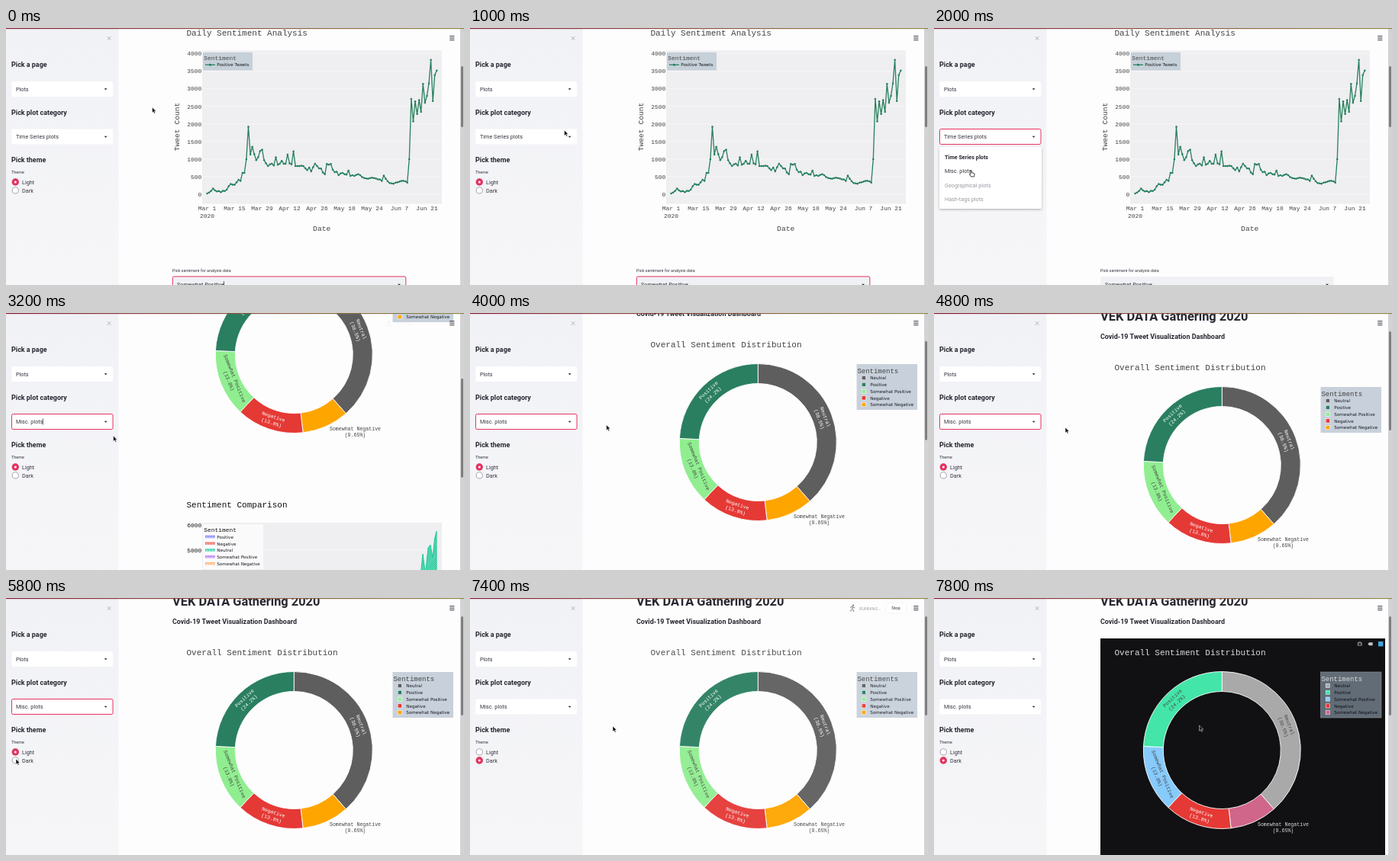
An HTML page that plays this animation: 600 px wide and 337 px high, repeating every 8 s.

```html
<!DOCTYPE html>
<html lang="en">
<head>
<meta charset="utf-8">
<title>Sentiment dashboard</title>
<style>
  html, body { margin: 0; width: 100%; height: 100%; overflow: hidden; background: #fefdfe; }
  svg { display: block; width: 100vw; height: 100vh; }
  text { font-family: Roboto, sans-serif; fill: #33343d; white-space: pre; }
  .b { font-weight: 700; fill: #262730; }
  .mono { font-family: "Liberation Mono", monospace; fill: #444; }
  .key { font-family: "DejaVu Sans", sans-serif; fill: #14181f; }
  .mid { text-anchor: middle; }
  .end { text-anchor: end; }
</style>
</head>
<body>
<svg id="stage" viewBox="0 0 600 337" preserveAspectRatio="none"></svg>
<script>
const LOOP = 8000, STEP = 200, RED = '#e8315f';

// ---------- drawing helpers ----------
const rect = (x, y, w, h, fill, more = '') =>
  `<rect x="${x}" y="${y}" width="${w}" height="${h}" fill="${fill}" ${more}/>`;
const text = (x, y, size, str, cls = '', more = '') =>
  `<text x="${x}" y="${y}" font-size="${size}" class="${cls}" ${more}>${str}</text>`;
const path = (d, more = '') => `<path d="${d}" ${more}/>`;
const dot = (x, y, r, more = '') => `<circle cx="${x}" cy="${y}" r="${r}" ${more}/>`;
const group = (id, body, more = '') => `<g id="${id}" ${more}>${body}</g>`;
const arrowDown = (x, y) => path(`M${x - 2} ${y - 0.9}h4l-2 2.1z`, 'fill="#262730"');
const caret = (id, x, y) => rect(x, y, 0.7, 8.4, '#262730', `id="${id}"`);

// ---------- sidebar ----------
const select = (y, label, id = '') =>
  rect(7.5, y, 132.5, 20, '#fff', `rx="1.8" ${id && `id="${id}Box"`}`) +
  text(13, y + 12.6, 7.25, label, '', id && `id="${id}Text"`) + arrowDown(130.6, y + 10.1);

const radio = (id, y, label) =>
  dot(12.3, y, 4.1, 'fill="#fff" stroke="#8f9098" stroke-width=".8"') +
  group(id, dot(12.3, y, 4.6, `fill="${RED}"`) + dot(12.3, y, 1.5, 'fill="#fff"')) +
  text(21, y + 2.7, 7.25, label);

const options = ['Time Series plots', 'Misc. plots', 'Geographical plots', 'Hash-tags plots'];
const menu = rect(7, 156, 134, 81, '#fff', 'rx="1.8" filter="url(#shadow)"') +
  options.map((o, i) => text(14, 171.8 + i * 18.4, 7.25, o, i ? '' : 'b',
    i > 1 ? 'style="fill:#9a9ba2"' : '')).join('');

const sidebar = rect(0, 0, 147.5, 337, 'url(#side)') +
  path('M132.8 11.2l4.6 4.6m0-4.6l-4.6 4.6', 'stroke="#a9abb3" stroke-width=".9"') +
  text(7, 51.3, 8.95, 'Pick a page', 'b') + select(70, 'Plots') +
  text(7, 113.8, 8.95, 'Pick plot category', 'b') + select(132.5, options[0], 'plot') +
  caret('plotCaret', 47.9, 138.3) +
  text(7, 176, 8.95, 'Pick theme', 'b') + text(7, 191, 5.5, 'Theme') +
  radio('light', 201.9, 'Light') + radio('dark', 212.9, 'Dark') + group('menu', menu);

// ---------- time series page ----------
// Daily counts in tens, starting on 1 March.
const daily = [2, 5, 9, 16, 11, 8, 9, 6, 10, 9, 13, 23, 29, 27, 27, 34, 41, 38, 61, 61, 100, 192, 113,
  135, 114, 97, 105, 123, 127, 97, 88, 80, 85, 87, 82, 105, 84, 87, 95, 87, 87, 113, 88, 85, 122, 80,
  80, 80, 81, 80, 74, 69, 76, 65, 77, 87, 80, 74, 73, 62, 57, 86, 84, 86, 70, 63, 64, 54, 59, 61, 57,
  56, 67, 52, 54, 52, 55, 57, 54, 49, 46, 45, 44, 46, 47, 46, 45, 42, 42, 38, 53, 44, 37, 32, 31, 30,
  33, 34, 36, 38, 38, 37, 33, 100, 271, 207, 264, 228, 268, 234, 314, 260, 280, 315, 382, 265, 339, 352];
const dates = ['Mar 1', 'Mar 15', 'Mar 29', 'Apr 12', 'Apr 26', 'May 10', 'May 24', 'Jun 7', 'Jun 21'];

function seriesPage() {
  const green = '#26805f';
  const pts = daily.map((v, d) => [(263.5 + d * 2.571).toFixed(1), (218 - v * 0.4612).toFixed(1)]);
  let out = text(236.5, 9.6, 11, 'Daily Sentiment Analysis', 'mono') + rect(257, 29.5, 314, 201, '#efeef0');
  for (let v = 0; v <= 4000; v += 500) {
    const y = 218 - v * 0.04612;
    out += rect(257, y - 0.3, 314, 0.6, '#fbfafc') + text(256.3, y + 2.8, 7.95, v, 'mono end');
  }
  out += dates.map((d, i) => text(263.5 + i * 36, 239.2, 7.9, d, 'mono mid')).join('') +
    text(263.5, 248.8, 7.9, '2020', 'mono mid') + text(413.7, 265.8, 9.66, 'Date', 'mono mid') +
    text(0, 0, 9.66, 'Tweet Count', 'mono mid', 'transform="translate(227 129.5) rotate(-90)"') +
    path('M' + pts.join('L'), `fill="none" stroke="${green}" stroke-width="1.3" stroke-linejoin="round"`) +
    pts.map(p => dot(p[0], p[1], 1.25, `fill="${green}"`)).join('') +
    rect(258, 32, 65, 23.5, '#c6d0d9') + text(259.3, 42, 7.9, 'Sentiment', 'mono') +
    rect(261, 47.6, 13, 1.3, green) + dot(267.5, 48.3, 1.5, `fill="${green}"`) +
    text(276.3, 50.4, 5.55, 'Positive Tweets', 'key') +
    text(218, 320.2, 5.4, 'Pick sentiment for analysis data') +
    rect(218.3, 325.9, 305.5, 20, '#f0f1f5', 'rx="1.8" id="moodBox"') +
    text(224, 338.6, 7.25, 'Somewhat Positive') + caret('moodCaret', 285.3, 332) + arrowDown(515, 336.6);
  return out;
}

// ---------- donut page ----------
// Clockwise from the top, in percent.
const shares = {
  'Neutral': 38.5, 'Somewhat Negative': 9.65, 'Negative': 13.8, 'Somewhat Positive': 13.8, 'Positive': 24.2
};
const legendOrder = ['Neutral', 'Positive', 'Somewhat Positive', 'Negative', 'Somewhat Negative'];
const themes = {
  day: { ink: '#444', key: '#14181f', panel: '#c8d1db', edge: 'none',
    fills: ['#5e5e5e', '#2a7f60', '#90ee90', '#e53935', '#ffa500'], inks: ['#fff', '#fff', '#444', '#fff'] },
  night: { ink: '#dcdcdc', key: '#0e1116', panel: '#626c76', edge: '#8d959c',
    fills: ['#a9a9a9', '#43e5a8', '#87cafc', '#e53935', '#d0668a'], inks: ['#444', '#444', '#444', '#fff'] }
};

function donut(theme) {
  const { ink, key, panel, edge, fills, inks } = themes[theme];
  const cx = 377.3, cy = 199.5, R = 103, r = 77, tau = Math.PI * 2, size = 6.58;
  const at = (a, rad) => `${(cx + rad * Math.sin(a)).toFixed(2)} ${(cy - rad * Math.cos(a)).toFixed(2)}`;
  const inkStyle = c => `style="fill:${c}"`;
  let out = text(236.5, 75, 11, 'Overall Sentiment Distribution', 'mono', inkStyle(ink)), turn = 0;
  for (const [name, share] of Object.entries(shares)) {
    const a = turn / 99.95 * tau, b = (turn += share) / 99.95 * tau, m = (a + b) / 2;
    const i = legendOrder.indexOf(name);
    out += path(`M${at(a, R)}A${R} ${R} 0 0 1 ${at(b, R)}L${at(b, r)}A${r} ${r} 0 0 0 ${at(a, r)}z`,
      `fill="${fills[i]}" stroke="#fff" stroke-width=".9"`);
    if (i === 4) continue;
    let deg = m * 360 / tau;
    if (deg > 90 && deg < 270) deg -= 180;
    // Wide labels move inwards so that their corners stay inside the ring.
    const reach = Math.min((R + r) / 2, Math.sqrt(R * R - (name.length * size * 0.3) ** 2) - 9.5);
    out += `<g transform="translate(${at(m, reach)}) rotate(${deg})">` +
      text(0, -2, size, name, 'mono mid', inkStyle(inks[i])) +
      text(0, 6.3, size, `(${share}%)`, 'mono mid', inkStyle(inks[i])) + '</g>';
  }
  out += text(457.5, 298.9, size, 'Somewhat Negative', 'mono mid', inkStyle(ink)) +
    text(457.5, 307.2, size, '(9.65%)', 'mono mid', inkStyle(ink)) +
    rect(506.5, 97, 79.5, 60, panel, `stroke="${edge}" stroke-width=".6"`) +
    text(507.5, 109, 8.95, 'Sentiments', 'mono', inkStyle(ink));
  legendOrder.forEach((name, i) => {
    const y = 115 + i * 8.8;
    out += rect(513.2, y - 2.6, 5.2, 5.2, fills[i], 'stroke="#fff" stroke-width=".5"') +
      text(524.3, y + 2.1, 5.65, name, 'key', inkStyle(key));
  });
  return out;
}

function comparison() {
  const names = ['Positive', 'Negative', 'Neutral', 'Somewhat Positive', 'Somewhat Negative'];
  const tones = ['#636efa', '#ef453b', '#00cc96', '#ab63fa', '#ffa15a'];
  const black = 'style="fill:#111"';
  return text(236.5, 399.8, 11, 'Sentiment Comparison', 'mono', black) +
    rect(257, 420, 314, 100, '#efeef0') + rect(257, 455.6, 314, 0.6, '#fbfafc') +
    text(256.3, 425.6, 7.95, '6000', 'mono end', black) + text(256.3, 458.6, 7.95, '5000', 'mono end', black) +
    path('M541 520L543 491L546 461L549.5 487L553 453L556 449L559 466L561.5 441L564 431V520z',
      'fill="url(#hatch)" stroke="#0fc795" stroke-width=".9"') +
    rect(258, 422, 79, 59, '#fbfafb') + text(259.3, 432.4, 7.9, 'Sentiment', 'mono', black) +
    names.map((n, i) => {
      const y = 438.7 + i * 8.8;
      return path(`M261 ${y}h13`, `stroke="${tones[i]}" stroke-width="3" stroke-dasharray="1 .4" opacity=".7"`) +
        path(`M261 ${y - 1.5}h13`, `stroke="${tones[i]}" stroke-width=".8"`) +
        text(276.3, y + 2.1, 5.6, n, 'key');
    }).join('');
}

const modebar =
  rect(554.7, 58, 6.2, 4.8, '#777', 'rx=".8"') + rect(556.3, 57.2, 2.8, 1.2, '#777') + dot(557.8, 60.5, 1.3, 'fill="#111"') +
  path('M568.3 60.2l1.8-2h4.6v4h-4.6z', 'fill="#c4c4c4"') + rect(582, 57, 6.4, 6.4, '#3fa4e0');

const miscPage = text(218, 9.8, 16.4, 'VEK DATA Gathering 2020', 'b') +
  text(218, 34.3, 8.95, 'Covid-19 Tweet Visualization Dashboard', 'b') +
  group('day', donut('day')) +
  group('night', rect(218, 53, 373, 300, '#111012') + donut('night') + modebar) + comparison();

// ---------- page chrome ----------
const chrome = group('running',
    dot(502, 9.6, 1.1, 'fill="#777"') +
    path('M501.6 11.2l-1 3 2 1.6v2.4M500.6 14.2l-1 2.6h-2M498.4 13.2l.8-1.6 2.4-.4 1.2 1.6h1.6',
      'fill="none" stroke="#777" stroke-width=".9"') +
    text(510, 15.6, 5.6, 'RUNNING...', '', 'style="fill:#a3a4ab"') +
    group('stop', rect(545, 6.5, 26.5, 13.5, '#fff', 'rx="1.8" stroke="#ececf0" stroke-width=".6"') +
      text(552.2, 15.3, 5.7, 'Stop'))) +
  path('M581.2 10.7h6.2m-6.2 2.5h6.2m-6.2 2.5h6.2', 'stroke="#33343c" stroke-width="1.1"') +
  rect(595, 0, 5, 337, '#d3d2d4') + rect(596, 0, 3, 80, '#7f7e82', 'rx="1.5" id="thumb"');

const pointer = group('pointer',
  group('arrow', path('M0 0V7.2L1.7 5.7L2.9 8.3L4.1 7.8L3 5.2H5.2z', 'fill="#111" stroke="#fff" stroke-width=".5"')) +
  group('hand', path('M-.6 0q.8-.8 1.4 0V2.8L4 3.5Q4.8 3.8 4.6 5L4 8H.2L-2.3 4.8Q-2 3.8-.6 4.8z',
    'fill="#fff" stroke="#111" stroke-width=".8"')));

document.getElementById('stage').innerHTML = `<defs>
  <linearGradient id="side" x2="0" y2="1"><stop stop-color="#f1f2f6"/><stop offset="1" stop-color="#f6f6f8"/></linearGradient>
  <linearGradient id="strip"><stop stop-color="#86203a"/><stop offset="1" stop-color="#8f8a4a"/></linearGradient>
  <pattern id="hatch" width="2" height="2" patternUnits="userSpaceOnUse" patternTransform="rotate(45)">
    <rect width="2" height="2" fill="#7fdcc0"/><rect width="1" height="2" fill="#16c998"/></pattern>
  <filter id="shadow" x="-10%" y="-10%" width="120%" height="125%">
    <feDropShadow dx="0" dy="1.2" stdDeviation="1.8" flood-color="#000" flood-opacity=".28"/></filter>
  </defs>` + rect(0, 0, 600, 337, '#fefdfe') + group('series', seriesPage()) + group('misc', miscPage) +
  sidebar + chrome + rect(0, 0, 600, 1.2, 'url(#strip)') + pointer;

// ---------- timeline ----------
const pointerKeys = [[0, 191.5, 104], [400, 190, 105], [800, 150, 126], [1200, 97, 142], [1400, 95, 144],
  [2000, 48.5, 187], [2400, 48.5, 187], [2600, 62, 184], [3200, 140.5, 161], [3600, 176, 150],
  [4200, 180, 145], [4800, 172, 150], [5800, 13, 211], [6200, 13, 211], [6600, 32, 207],
  [7400, 187, 168], [7800, 347.5, 167]];
const scrollKeys = [[3400, 145], [3600, 118], [3800, 68], [4000, 30], [4200, 11], [4400, 0]];
const runKeys = [[2000, 0], [2200, 0.5], [2400, 0.5], [2600, 1], [2800, 1], [3000, 0.6], [3200, 0.08], [3400, 0],
  [6200, 0], [6400, 0.5], [6600, 1], [7400, 1], [7600, 0.3], [7800, 0]];
const fadeKeys = [[6800, 1], [7200, 0.95]];

function sample(keys, t, col = 1) {
  const i = keys.findIndex(k => k[0] > t);
  if (i === 0) return keys[0][col];
  if (i < 0) return keys[keys.length - 1][col];
  const [a, b] = [keys[i - 1], keys[i]];
  return a[col] + (b[col] - a[col]) * (t - a[0]) / (b[0] - a[0]);
}

const el = Object.fromEntries([...document.querySelectorAll('#stage [id]')].map(e => [e.id, e]));
const show = (id, on) => { el[id].style.display = on ? '' : 'none'; };
const outline = (id, on) => el[id].setAttribute('stroke', on ? RED : 'none');
const blink = since => since >= 0 && since % 1060 < 530;

function render(t) {
  const misc = t >= 2800, picked = t >= 2200, dark = t >= 6200, night = t >= 7600;
  const scroll = sample(scrollKeys, t);
  show('series', !misc);
  show('misc', misc);
  show('day', !night);
  show('night', night);
  el.misc.setAttribute('transform', `translate(0 ${-scroll})`);
  el.day.style.opacity = sample(fadeKeys, t);
  el.thumb.setAttribute('y', misc ? 24 + scroll * 0.425 : 50);
  el.thumb.setAttribute('height', misc ? 130 : 80);

  outline('moodBox', t < 1200);
  show('moodCaret', t < 1200 && blink(t));
  outline('plotBox', t >= 1200 && !dark);
  el.plotText.textContent = options[picked ? 1 : 0];
  show('plotCaret', picked && !dark && blink(t - 2085));
  show('menu', t >= 1400 && !picked);
  show('light', !dark);
  show('dark', dark);

  el.running.style.opacity = sample(runKeys, t);
  show('stop', t >= 2600 && t < 3200 || t >= 6600);
  const hand = t >= 1600 && t < 2600;
  show('hand', hand);
  show('arrow', !hand);
  el.pointer.setAttribute('transform', `translate(${sample(pointerKeys, t)} ${sample(pointerKeys, t, 2)})`);
}

const start = performance.now();
function tick() {
  const t = (performance.now() - start) % LOOP;
  render(Math.floor(t / STEP) * STEP);
  requestAnimationFrame(tick);
}
tick();
</script>
</body>
</html>
```
